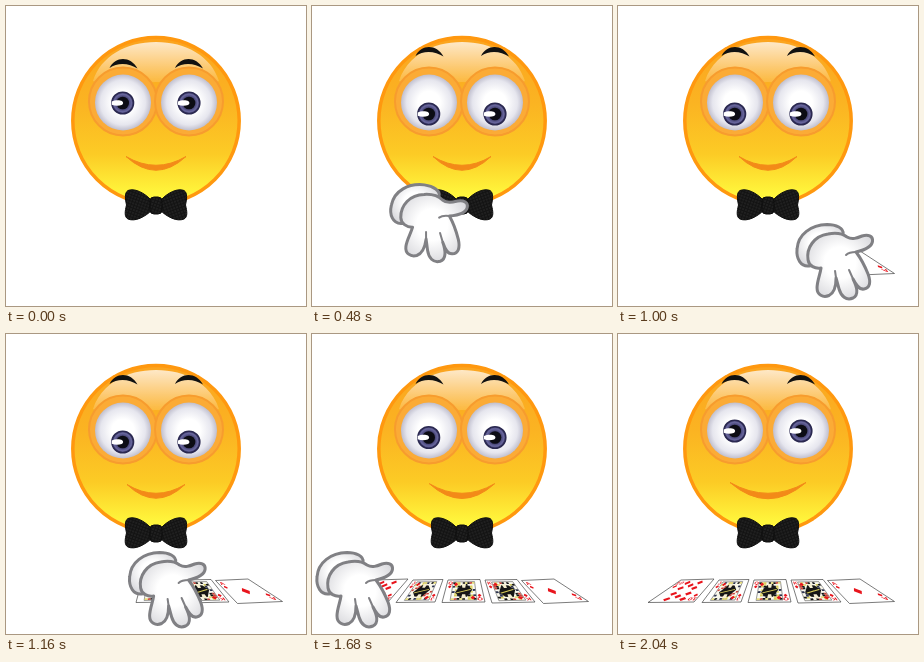
An HTML page that plays this animation: 300 by 300 pixels, repeating every 3.64 s.

```html
<!DOCTYPE html>
<html lang="en">
<head>
<meta charset="utf-8">
<title>Card dealer</title>
<style>
html, body { margin: 0; width: 100%; height: 100%; overflow: hidden; background: #fff; }
svg { display: block; width: 100vw; height: 100vh; }
text { font-family: "Liberation Sans", Arial, sans-serif; font-weight: bold; }
</style>
</head>
<body>
<svg viewBox="0 0 300 300">
  <defs>
    <linearGradient id="skin" x1="0" y1="0" x2="0" y2="1">
      <stop offset="0" stop-color="#fba41f"/>
      <stop offset=".4" stop-color="#fbb422"/>
      <stop offset=".7" stop-color="#fccb25"/>
      <stop offset=".94" stop-color="#fff63c"/>
      <stop offset="1" stop-color="#fff63c"/>
    </linearGradient>
    <linearGradient id="gloss" x1="0" y1="0" x2="0" y2="1">
      <stop offset="0" stop-color="#fff" stop-opacity=".75"/>
      <stop offset="1" stop-color="#fff" stop-opacity=".08"/>
    </linearGradient>
    <radialGradient id="white">
      <stop offset=".4" stop-color="#fff"/>
      <stop offset=".8" stop-color="#e6e6ee"/>
      <stop offset="1" stop-color="#c0bfce"/>
    </radialGradient>
    <radialGradient id="iris">
      <stop offset=".5" stop-color="#3a3865"/>
      <stop offset=".8" stop-color="#67659c"/>
      <stop offset="1" stop-color="#4a4878"/>
    </radialGradient>
    <radialGradient id="glove" cx=".5" cy=".45" r=".6">
      <stop offset=".4" stop-color="#fff"/>
      <stop offset="1" stop-color="#d9d9dd"/>
    </radialGradient>
    <pattern id="weave" width="3" height="3" patternUnits="userSpaceOnUse" patternTransform="rotate(20)">
      <rect width="3" height="3" fill="#131313"/>
      <path d="M0 1H2" stroke="#3a3a3a" stroke-width=".7"/>
    </pattern>
    <path id="brow" d="M-14 9C-8 -3 7 -3 14 9.5C6 4 -6 3 -14 9Z"/>
    <g id="socket">
      <circle r="34" fill="#fbab36" stroke="#f79c2e" stroke-width="2"/>
      <circle cy="1" r="28" fill="url(#white)"/>
    </g>
    <g id="pupil">
      <circle r="10.8" fill="url(#iris)" stroke="#2a2850" stroke-width="1.6"/>
      <circle r="6.3" fill="#0c0c14"/>
      <path d="M-11 -1.5C-8 -3 -3 -3.2 -.5 -1.8C1 -.6 .6 1.4 -1 2C-4 3 -8 2.8 -11 1.8Z" fill="#fff"/>
    </g>
    <path id="wing" fill="url(#weave)" stroke="#0c0c0c" d="M146 195C138 186 128 182 122 184.5C118 187 119.5 194 120.5 199C119 205 118 211 122 213C129 216 139 211 146 204Z"/>
  </defs>

  <circle cx="150" cy="114.7" r="83.2" fill="url(#skin)" stroke="#ff980f" stroke-width="3.5"/>
  <path d="M87 75C95 50 120 36 150 36S205 50 213 75C196 85 174 76 150 76S104 85 87 75Z" fill="url(#gloss)"/>
  <use href="#socket" x="117" y="95.5"/>
  <use href="#socket" x="183" y="95.5"/>
  <g id="pupils"><use href="#pupil" x="116.7"/><use href="#pupil" x="183"/></g>
  <g id="brows" fill="#111"><use href="#brow" x="117.5"/><use href="#brow" x="183"/></g>
  <path id="mouth" fill="#f38a18" stroke="#f38a18" stroke-linejoin="round"/>
  <use href="#wing"/>
  <use href="#wing" transform="translate(300) scale(-1 1)"/>
  <rect x="144" y="191" width="12" height="17" rx="4" fill="url(#weave)" stroke="#0c0c0c"/>

  <g id="cards"></g>

  <g id="hand" fill="url(#glove)" stroke="#808084" stroke-width="3" stroke-linejoin="round" stroke-linecap="round">
    <path d="M14 43C6 44 1 36 2 26C3 11 16 2 32 1.5C41 1.5 49 5 48 11L20 42Z"/>
    <path d="M13 37C11 25 19 13 33 11C43 9 48 11 52 14C57 17 62 15 67 13C73 11 78 13 77.5 18C77 24 70 27 61 29C64 33 69 41 73 51C76 59 75 65 69 66C64 67 61 62 58 56C62 64 64 72 58 75C51 78 46 73 44 66L41 55C41 63 39 70 34 72.5C28 75 22 72 22 65C22 58 25 52 26 45C20 46 14 43 13 37Z"/>
    <path d="M58 56L54 47M41 55L40 48M61 29C56 29 53 30 51 32" fill="none" stroke-width="2"/>
  </g>
</svg>
<script>
const LOOP = 3640, STEP = 40;
const $ = id => document.getElementById(id);
const clamp = p => Math.min(1, Math.max(0, p));
const span = (t, a, b) => clamp((t - a) / (b - a));
const smooth = p => p * p * (3 - 2 * p);
const mix = (a, b, p) => a + (b - a) * p;

let seed = 11;
const random = () => (seed = (seed * 16807) % 2147483647) / 2147483647;

function add(parent, tag, attrs) {
  const el = document.createElementNS("http://www.w3.org/2000/svg", tag);
  for (const k in attrs) el.setAttribute(k, attrs[k]);
  return parent.appendChild(el);
}

// Corners run top left, top right, bottom right, bottom left.
const deck = [
  { rank: "10", at: 28, quad: [63, 246, 96, 245, 76, 268, 30, 268.5] },
  { rank: "J", at: 80, quad: [101, 246, 131, 245.5, 123, 268, 84, 268.5] },
  { rank: "Q", at: 126, quad: [136, 246, 168, 245.5, 173, 268, 130, 268.5] },
  { rank: "K", at: 172, quad: [173, 246, 205, 245.5, 223, 268, 180, 269] },
  { rank: "A", at: 203.5, quad: [209.5, 246.5, 242, 245, 276.5, 267.5, 231.5, 269.5] }
];

function buildCard(card) {
  const q = card.quad, g = add($("cards"), "g", {});
  const place = (u, v) => [0, 1].map(i =>
    mix(mix(q[i], q[i + 2], u), mix(q[i + 6], q[i + 4], u), v));
  const shape = (points, attrs) => add(g, "polygon",
    { points: points.map(([u, v]) => place(u, v).map(n => n.toFixed(2)).join()).join(" "), ...attrs });
  const box = (u, v, w, h, attrs) =>
    shape([[u, v], [u + w, v], [u + w, v + h], [u, v + h]], attrs);
  const pip = (u, v, w, h) =>
    shape([[u, v - h], [u + w, v], [u, v + h], [u - w, v]], { fill: "#e8141c" });

  function corner(u, v, turn) {
    const o = place(u, v), x = place(u + .01, v), y = place(u, v + .01);
    const m = [x[0] - o[0], x[1] - o[1], y[0] - o[0], y[1] - o[1], ...o];
    const label = add(g, "text", { transform: `matrix(${m}) rotate(${turn})`,
      "font-size": 18, y: 7, "text-anchor": "middle", fill: "#e8141c" });
    label.textContent = card.rank;
    pip(u, v + (turn ? -.17 : .17), .05, .07);
  }

  box(0, 0, 1, 1, { fill: "#fff", stroke: "#444", "stroke-width": .7, "stroke-linejoin": "round" });
  if (card.rank === "A") pip(.5, .5, .1, .14);
  else if (card.rank === "10") {
    for (const u of [.32, .68]) for (const v of [.14, .38, .62, .86]) pip(u, v, .08, .09);
    for (const v of [.26, .74]) pip(.5, v, .08, .09);
  } else court();
  corner(.1, .13, 0);
  corner(.9, .87, 180);

  // A dark figure in a patterned robe, alike when turned over.
  function court() {
    const inks = ["#141414", "#141414", "#2c3350", "#d9cd5a", "#e6dc78", "#f7f5e6", "#f7f5e6", "#c8443a"];
    box(.18, .09, .64, .82, { fill: "#fbfaf0", stroke: "#333", "stroke-width": .5 });
    for (let r = 0; r < 5; r++) for (let c = 0; c < 9; c++) {
      if (random() < .3) continue;
      const u = .19 + c * .069, v = .11 + r * .078;
      const fill = inks[Math.floor(random() * inks.length)];
      box(u, v, .069, .078, { fill });
      box(1 - u - .069, 1 - v - .078, .069, .078, { fill });
    }
    shape([[.42, .24], [.62, .26], [.73, .45], [.58, .76], [.38, .74], [.27, .55]], { fill: "#161616" });
    shape([[.44, .18], [.56, .18], [.54, .36], [.46, .36]], { fill: "#f5eed0" });
    shape([[.56, .82], [.44, .82], [.46, .64], [.54, .64]], { fill: "#f5eed0" });
    shape([[.3, .56], [.68, .41], [.7, .45], [.32, .6]], { fill: "#d9cd5a" });
    pip(.27, .2, .06, .08);
    pip(.73, .8, .06, .08);
  }
  card.el = g;
}
deck.forEach(buildCard);

function draw(t) {
  const look = span(t, 0, 440);
  const back = Math.pow(span(t, 1360, 1920), 1.6);
  $("pupils").setAttribute("transform", `translate(0 ${97 + 11 * (look - back)})`);
  $("brows").setAttribute("transform", `translate(0 ${mix(53, 41, look)})`);

  const half = 30 - look + 9 * back, y = 150.5 - 2 * back;
  $("mouth").setAttribute("d", `M${150 - half} ${y}Q150 ${168 + 2 * back} ${150 + half} ${y}` +
    `Q150 ${178 + 3 * back} ${150 - half} ${y}Z`);

  const reach = smooth(span(t, 408, 588));
  const deal = smooth(span(t, 820, 1590));
  const lift = span(t, 1760, 2000);
  const x = 5 + 200 * reach - 202 * deal;
  const handY = mix(157, 217, reach) - 58 * lift;
  $("hand").setAttribute("transform", `translate(${x} ${handY}) rotate(${12 * (1 - reach)} 40 38)`);
  $("hand").setAttribute("opacity", span(t, 240, 400) - span(t, 1880, 2040));

  for (const card of deck)
    card.el.setAttribute("visibility", t > 820 && x <= card.at ? "visible" : "hidden");
}

const start = performance.now();
function tick() {
  const t = (performance.now() - start) % LOOP;
  draw(Math.floor(t / STEP) * STEP);
  requestAnimationFrame(tick);
}
draw(0);
requestAnimationFrame(tick);
</script>
</body>
</html>
```
